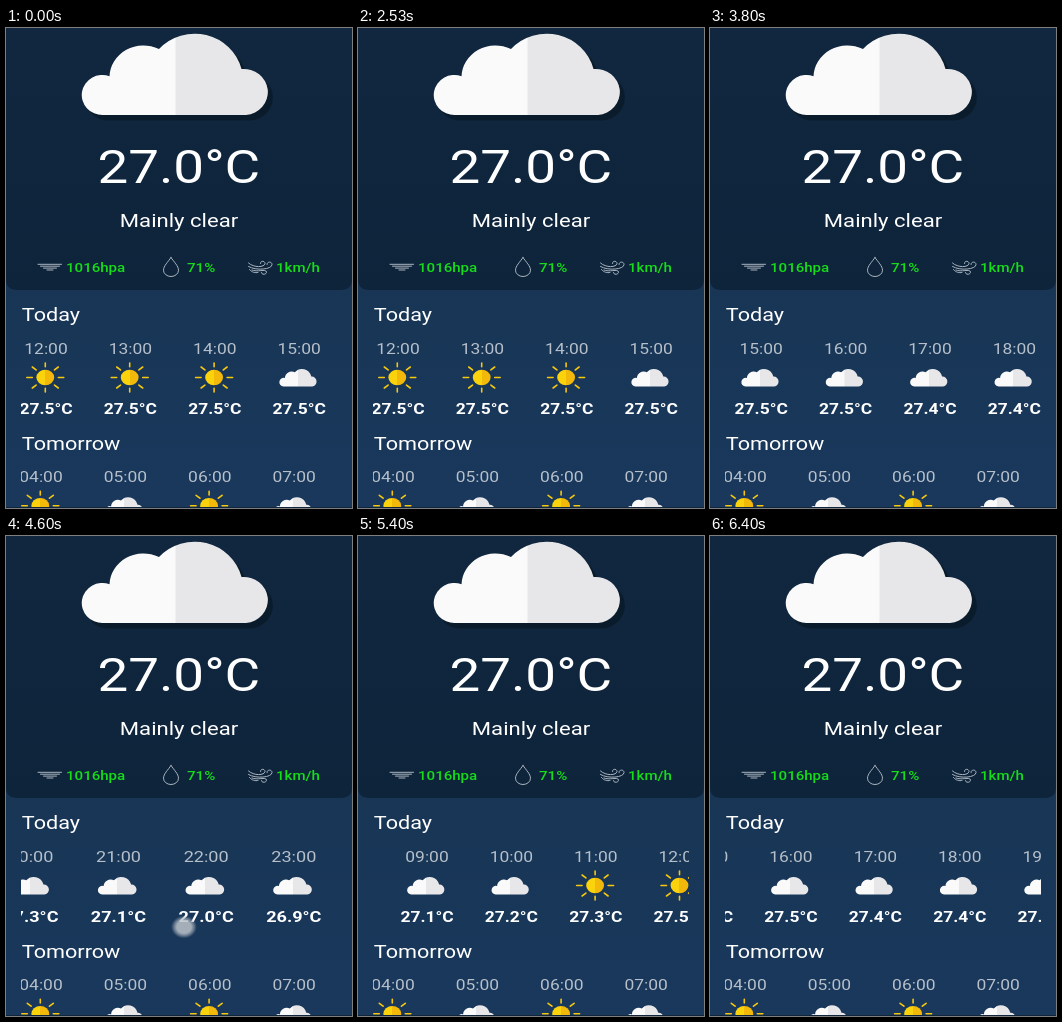
Recreate the animation shown at these times as an HTML page. Size 346 px wide and 480 px high, loop 6470 ms.

```html
<!DOCTYPE html>
<html lang="en">
<head>
<meta charset="utf-8">
<title>Weather</title>
<style>
  html, body { margin: 0; width: 100%; height: 100%; overflow: hidden; background: #183656; }
  svg { display: block; width: 100vw; height: 100vh; }
  text { font-family: Roboto, "Open Sans", sans-serif; fill: #fff; }
  .now { font-size: 46.8px; }
  .sky { font-size: 18.9px; }
  .hour { font-size: 14.9px; fill: #b7c0ca; }
  .temp { font-size: 14.9px; font-weight: 700; }
  .metric { font-size: 12.9px; font-weight: 500; fill: #16dc1a; }
  .title { font-size: 18.5px; }
  .line { fill: none; stroke: #aab4be; stroke-linecap: round; }
</style>
</head>
<body>
<svg viewBox="0 0 346 480" preserveAspectRatio="none">
  <defs>
    <linearGradient id="page" x2="0" y2="1">
      <stop offset=".5" stop-color="#183554"/><stop offset="1" stop-color="#19385c"/>
    </linearGradient>
    <linearGradient id="card" x2="0" y2="1">
      <stop stop-color="#10273f"/><stop offset="1" stop-color="#0e243b"/>
    </linearGradient>
    <linearGradient id="cloudFill" gradientUnits="userSpaceOnUse" x1="169" x2="170">
      <stop stop-color="#fafafa"/><stop offset="1" stop-color="#e7e7e9"/>
    </linearGradient>
    <linearGradient id="sunFill">
      <stop offset=".5" stop-color="#fbd30c"/><stop offset=".5" stop-color="#f2b90a"/>
    </linearGradient>
    <radialGradient id="touchFill">
      <stop offset=".55" stop-color="#bcc3ca" stop-opacity=".85"/>
      <stop offset=".75" stop-color="#a3adb8" stop-opacity=".6"/>
      <stop offset="1" stop-color="#8795a5" stop-opacity="0"/>
    </radialGradient>
    <clipPath id="list"><rect x="15" y="300" width="316" height="180"/></clipPath>
    <path id="cloud" d="M97 87A20.7 20 0 1 1 103.5 48.2A34 32 0 0 1 153 21A48.5 47.5 0 0 1 235.5 41A24 23 0 1 1 240 87Z"/>
    <g id="sun">
      <ellipse rx="8.9" ry="7.8" fill="url(#sunFill)"/>
      <path d="M-18.5 0H-13M13 0H18.5M0-14.5V-10.8M0 10.8V14.5M-13-10.5L-9.2-7.6M13-10.5L9.2-7.6M-13 10.5L-9.2 7.6M13 10.5L9.2 7.6"
        fill="none" stroke="#f6c70f" stroke-width="1.6" stroke-linecap="round"/>
    </g>
  </defs>
  <rect width="346" height="480" fill="url(#page)"/>
  <path d="M0 0H346V251Q346 262 335 262H11Q0 262 0 251Z" fill="url(#card)"/>
  <use href="#cloud" x="5" y="5.5" fill="#0a1c2c"/>
  <use href="#cloud" fill="url(#cloudFill)"/>
  <g class="line">
    <path d="M32 236.3H55.5M34.5 238.2H53.5M37.5 240.1H50.5M41 242H47"/>
    <path d="M165 229.5C162 234 157.5 238 157.5 242.2A7.5 6.3 0 0 0 172.5 242.2C172.5 238 168 234 165 229.5Z"/>
    <path d="M242.5 235C248 240 258.5 239.5 259 235.5C259 232.500 254 232.500 254.500 235.500M242.500 238.500C250 243 266 241.500 266 236.500C266 233 260.500 233.500 261 236.500M246 242C251 244.500 260 240.500 260.500 244C260.500 247 255 247 255.500 244.500M243.500 241.500C246 244.500 249 245 252 244.500"/>
  </g>
  <g id="labels"></g>
  <g clip-path="url(#list)"><g id="today"></g></g>
  <g clip-path="url(#list)" id="tomorrow"></g>
  <rect y="479" width="346" height="1" fill="#10243a"/>
  <ellipse id="touch" cy="391" rx="13" ry="11.5" fill="url(#touchFill)"/>
</svg>
<script>
const LOOP = 6470;
const FPS = 15;
const PITCH = 84.4;
const RIGHT = 331;
const END = 679;
const el = id => document.getElementById(id);

// The whole screen is a little wider than its natural proportions.
const label = (x, y, content, cls, anchor = "start") =>
  `<text transform="translate(${x} ${y}) scale(1.17 1)" class="${cls}" text-anchor="${anchor}">${content}</text>`;
const centred = (x, y, content, cls) => label(x, y, content, cls, "middle");

function cell(x, top, hour, sunny, temp) {
  const icon = sunny
    ? `<use href="#sun" transform="translate(${x - .7} ${top + 28.5})"/>`
    : `<use href="#cloud" fill="url(#cloudFill)"
        transform="translate(${x - 1} ${top + 28.5}) scale(.2 .215) translate(-170 -45.5)"/>`;
  return centred(x, top + 5, String(hour).padStart(2, "0") + ":00", "hour") + icon +
    centred(x, top + 64.5, temp.toFixed(1) + "°C", "temp");
}

function temperature(hour) {
  if (hour < 12) return 27.1 + (hour - 9) / 10;
  if (hour < 17) return 27.5;
  if (hour < 19) return 27.4;
  return hour < 21 ? 27.3 : 27.1 - (hour - 21) / 10;
}

el("labels").innerHTML =
  centred(172.8, 154.8, "27.0°C", "now") +
  centred(173, 198.7, "Mainly clear", "sky") +
  label(60, 244, "1016hpa", "metric") +
  label(181, 244, "71%", "metric") +
  label(270, 244, "1km/h", "metric") +
  label(15.8, 293, "Today", "title") +
  label(15.8, 421.5, "Tomorrow", "title");

let cells = "";
for (let hour = 0; hour < 24; hour++)
  cells += cell(40 + PITCH * (hour - 12), 321, hour, hour > 10 && hour < 15, temperature(hour));
el("today").innerHTML = cells;

cells = "";
for (let hour = 4; hour < 8; hour++)
  cells += cell(35 + PITCH * (hour - 4), 449.3, hour, hour % 2 === 0, 27);
el("tomorrow").innerHTML = cells;

const push = p => p * p;
const coast = p => 1 - (1 - p) ** 2;

// Each key: time, scroll position, easing on the way to it. Beyond END the list stretches.
const keys = [
  [3490, 0], [3690, 100, push], [4430, 616, coast],
  [4600, 714, coast], [4680, 718, coast], [4800, END, coast],
  [4830, END], [4980, 520, push], [5680, -435, coast],
  [5740, -435], [5900, -280, push], [6700, 391, coast]
];
// Each drag: start, end, finger x plus scroll position.
const drags = [
  [3440, 3690, 250], [4430, 4680, 892], [4810, 4980, 769], [5720, 5900, -175]
];

function scrollAt(t) {
  const next = keys.findIndex(key => key[0] > t);
  if (next === 0) return keys[0][1];
  const [t0, from] = keys[next - 1];
  const [t1, to, ease = push] = keys[next];
  return from + (to - from) * ease((t - t0) / (t1 - t0));
}

function render(t) {
  const scroll = scrollAt(t);
  const stretch = 1 + Math.max(0, scroll - END) * .0011;
  el("today").setAttribute("transform",
    `translate(${RIGHT} 0) scale(${stretch} 1) translate(${-RIGHT - Math.min(scroll, END)} 0)`);
  const drag = drags.find(([start, end]) => t >= start && t < end);
  el("touch").setAttribute("visibility", drag ? "visible" : "hidden");
  if (drag) el("touch").setAttribute("cx", drag[2] - scroll);
}

const began = performance.now();
function frame() {
  const t = (performance.now() - began) % LOOP;
  // The small offset keeps times rounded to 10 ms on their own step.
  render(Math.floor((t + 4) * FPS / 1000) * 1000 / FPS);
  requestAnimationFrame(frame);
}
frame();
</script>
</body>
</html>
```
